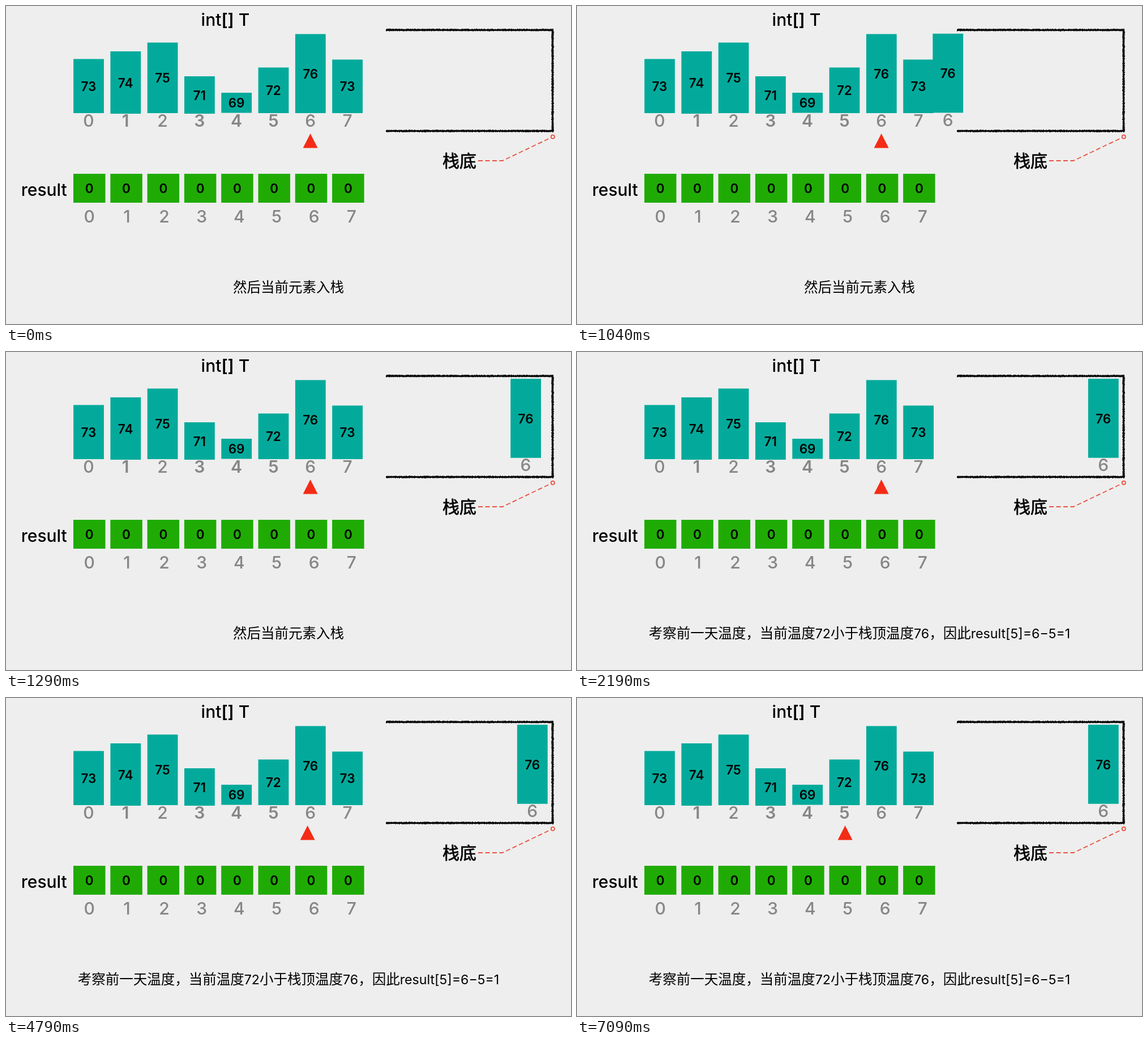
Animation, 998 px wide and 561 px high, one loop 7.99 s. Source, as an HTML page:

```html
<!DOCTYPE html>
<html lang="zh-CN">
<head>
<meta charset="utf-8">
<title>int[] T</title>
<style>
html, body { margin: 0; width: 100%; height: 100%; overflow: hidden; background: #eee; }
svg { display: block; width: 100%; height: 100%; }
text { font: 500 30px Inter, sans-serif; text-anchor: middle; }
.index { fill: #868686; }
.value { font-size: 22.5px; font-weight: 600; }
.cjk, .caption { font-family: "Noto Sans CJK SC", "Noto Sans CJK", sans-serif; }
.cjk { stroke: #000; stroke-width: .7; }
.caption { font-size: 24.5px; font-weight: 400; }
.caption tspan { font-family: Inter, sans-serif; font-size: 23.2px; }
</style>
</head>
<body>
<svg viewBox="0 0 998 561">
  <text x="387.5" y="35">int<tspan font-weight="600">[]</tspan> T</text>
  <text x="67.3" y="335">result</text>
  <text class="cjk" x="801" y="284">栈底</text>
  <path d="M834 273H877L963 232" fill="none" stroke="#e9513f" stroke-width="1.8" stroke-dasharray="8 4.5"/>
  <circle cx="965.8" cy="230.8" r="3.1" fill="#eee" stroke="#e9513f" stroke-width="1.8"/>
  <g id="cells"></g>
  <path d="M672 42.3H965.5V220.5H672" fill="none" stroke="#0a0a0a" stroke-width="2.8" stroke-linejoin="round"/>
  <path id="rough" stroke="#0a0a0a" stroke-width="1"/>
  <path id="pointer" d="M0 225L13 250.5H-13Z" fill="#f42c16"/>
  <g id="pushed"></g>
  <text id="caption" class="caption" x="499" y="505"></text>
</svg>
<script>
const LOOP = 7990, STEP = 50, PITCH = 65.3;
const $ = id => document.getElementById(id);

const rect = (x, y, w, h, fill) => `<rect x="${x}" y="${y}" width="${w}" height="${h}" fill="${fill}"/>`;
const label = (cls, x, y, s, weight = '') =>
  `<text class="${cls}" x="${x}" y="${y}" style="font-weight:${weight}">${s}</text>`;

const temps = [73, 74, 75, 71, 69, 72, 76, 73];
const tops = [93.5, 80, 64.5, 124, 153, 108.5, 49.5, 94.5];
const bottoms = [189, 190, 189, 190, 188.5, 189, 189, 189];

function bar(i) {
  const x = 119.1 + PITCH * i, mid = x + 26.8, top = tops[i], bottom = bottoms[i];
  return rect(x, top, 53.8, bottom - top, '#03aa9b') +
    label('value', mid, (top + bottom) / 2 + 8.6, temps[i]) +
    label('index', mid, 212.7, i, [1, 3, 4, 5].includes(i) ? 600 : 500);
}

function resultCell(i) {
  const x = 119 + PITCH * i;
  return rect(x, 296, 56.5, 51, '#1fab04') +
    label('value', x + 28.2, 329.7, 0) +
    label('index', 147.3 + 66.15 * i, 382, i);
}

$('cells').innerHTML = temps.map((_, i) => bar(i) + resultCell(i)).join('');
$('pushed').innerHTML = bar(6);

// Short random ticks across the stack outline give it a chalky edge.
let seed = 7;
const rand = () => (seed = seed * 16807 % 2147483647) / 2147483647;
const reach = () => 1.2 + rand() * 1.3;
let ticks = '';
for (let x = 671.5; x < 967; x++)
  for (const y of [42.3, 220.5]) ticks += `M${x} ${y - reach()}V${y + reach()}`;
for (let y = 42.5; y < 222; y++) ticks += `M${965.5 - reach()} ${y}H${965.5 + reach()}`;
$('rough').setAttribute('d', ticks);

const captions = [
  '然后当前元素入栈',
  '考察前一天温度，当前温度72小于栈顶温度76，因此result[5]=6−5=1'
].map(s => s.replace(/[\w[\]=−]+/g, '<tspan>$&</tspan>'));
let shown = -1;

function ease(t, start, span = 480) {
  const u = Math.min(1, Math.max(0, (t - start) / span));
  return (1 - Math.cos(Math.PI * u)) / 2;
}
const move = (id, x, y) => $(id).setAttribute('transform', `translate(${x} ${y})`);

function draw(now) {
  const ms = now % LOOP;
  const t = Math.floor((ms - 40) / STEP) * STEP + 40;

  const push = ease(t, 863);
  $('pushed').style.display = t >= 940 ? '' : 'none';
  move('pushed', 392 * push, -2.3 * push);

  const back = t >= 4790 ? ease(t, 4704) : 0;
  move('pointer', 537.6 - 64 * back, 0);

  const current = t >= 2190 ? 1 : 0;
  if (current !== shown) $('caption').innerHTML = captions[shown = current];
}

function tick() {
  draw(performance.now());
  requestAnimationFrame(tick);
}
tick();
</script>
</body>
</html>
```
